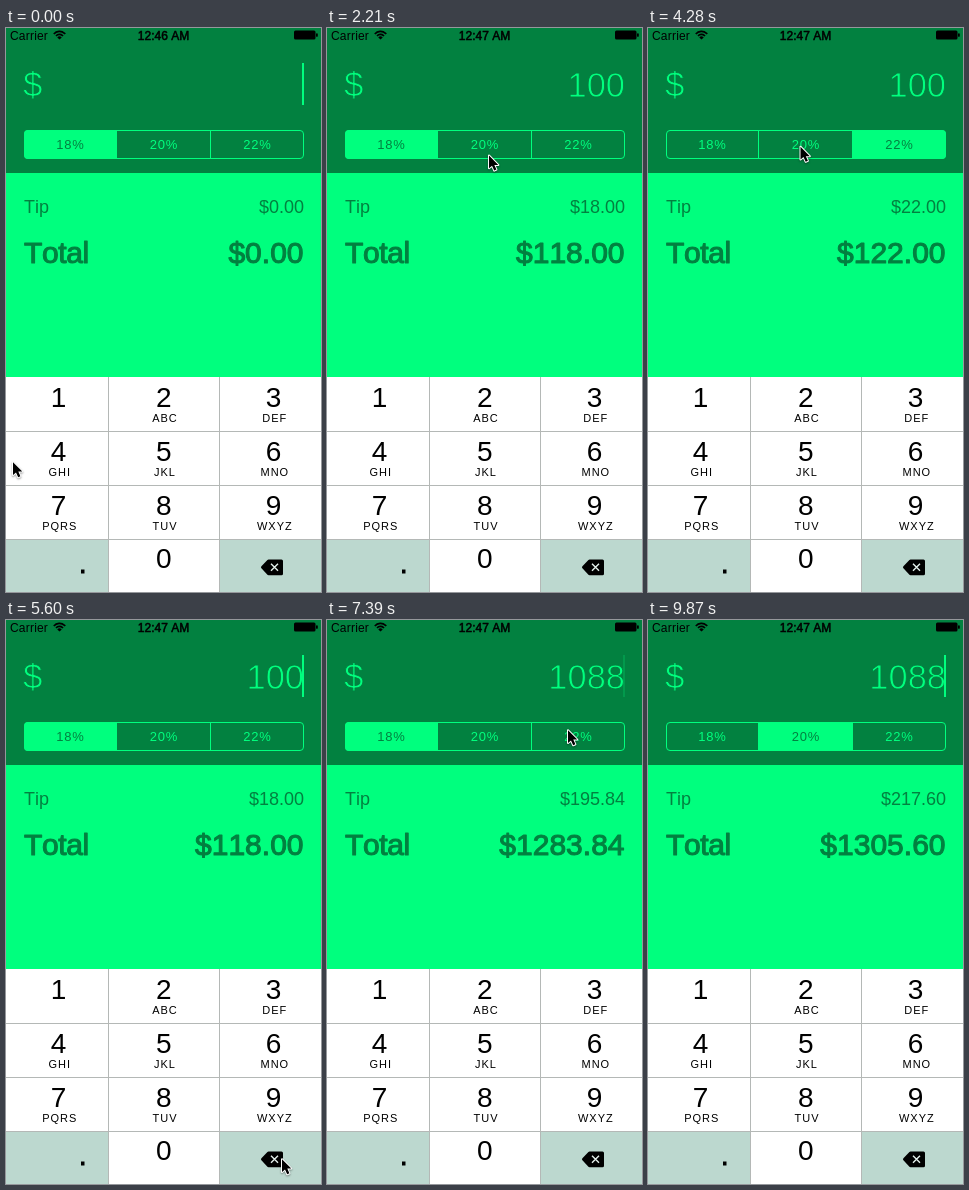
An HTML page with a canvas for the animation above (9970 ms loop, 315x564 px).

```html
<!DOCTYPE html>
<html lang="en">
<head>
<meta charset="utf-8">
<title>Tip calculator</title>
<style>
  html, body { margin: 0; width: 100%; height: 100%; overflow: hidden; background: #00ff7e; }
  canvas { display: block; width: 315px; height: 564px; }
</style>
</head>
<body>
<canvas id="stage" width="315" height="564"></canvas>
<script>
const ctx = document.getElementById('stage').getContext('2d');
const LOOP = 9970, STEP = 147.3;
const DARK = '#028140', NEON = '#00ff7e', TINT = '#bcd8cf', LINE = '#b4b8b6';
const FACE = '"Liberation Sans", Arial, sans-serif';
const BACK = 'back';

// What the user does: key taps, rate choices, and the pointer's moves between stops.
const taps = [[730, 1], [1310, 0], [1600, 0], [5740, BACK], [6180, 8], [6470, 8]]
  .map(([time, key]) => ({ time, key }));
const choices = [[0, 0], [2490, 1], [3670, 2], [5000, 0], [7500, 2], [8530, 1]]
  .map(([time, index]) => ({ time, index }));
const home = { x: 6, y: 433 };
const moves = [
  { from: 0, to: 730, x: 54, y: 380 },
  { from: 880, to: 1178, x: 162, y: 546 },
  { from: 1760, to: 2250, x: 161, y: 118 },
  { from: 2650, to: 3240, x: 246, y: 117 },
  { from: 3770, to: 4730, x: 69, y: 118 },
  { from: 5010, to: 5590, x: 275, y: 538 },
  { from: 5890, to: 6190, x: 162, y: 487 },
  { from: 6630, to: 6930, x: 240, y: 109 },
  { from: 8200, to: 8500, x: 158, y: 117 },
  { from: 8600, to: 9040, x: 330, y: 470 }
];
const rates = [18, 20, 22];

const clamp = v => Math.min(1, Math.max(0, v));
const ease = u => u * u * (3 - 2 * u);

function pointerAt(t) {
  return moves.reduce((p, m) => {
    const u = ease(clamp((t - m.from) / (m.to - m.from)));
    return { x: p.x + (m.x - p.x) * u, y: p.y + (m.y - p.y) * u };
  }, home);
}

function amountAt(t) {
  return taps.filter(tap => tap.time <= t)
    .reduce((s, { key }) => key === BACK ? s.slice(0, -1) : s + key, '');
}

// The caret blinks once a second but stays lit while typing.
function caretAlpha(t) {
  if (taps.some(tap => t >= tap.time && t < tap.time + 500)) return 1;
  const shift = t < 5740 ? 425 : 130;
  const phase = (t + shift) % 1000;
  return phase > 960 ? 1 : clamp((510 - phase) / 80);
}

function rect(color, x, y, w, h) {
  ctx.fillStyle = color;
  ctx.fillRect(x, y, w, h);
}

function rounded(x, y, w, h, r) {
  ctx.beginPath();
  ctx.roundRect(x, y, w, h, r);
}

// An edge stroke in the text colour thickens the letters; in the background colour it thins them.
function text(s, x, y, size, color, { align = 'left', gap = 0, edge = 0, edgeColor = color } = {}) {
  ctx.font = size + 'px ' + FACE;
  ctx.fontKerning = 'none';
  ctx.textAlign = align;
  ctx.letterSpacing = gap + 'px';
  ctx.fillStyle = color;
  if (align === 'center') x += gap / 2;
  ctx.fillText(s, x, y);
  if (edge) {
    ctx.lineWidth = edge;
    ctx.lineJoin = 'round';
    ctx.strokeStyle = edgeColor;
    ctx.strokeText(s, x, y);
  }
}

function statusBar(t) {
  text('Carrier', 4, 11.5, 12, '#000', { gap: .2 });
  text(t < 580 ? '12:46 AM' : '12:47 AM', 157.5, 11.5, 12, '#000', { align: 'center', edge: .5 });
  ctx.strokeStyle = ctx.fillStyle = '#000';
  ctx.lineWidth = 1.7;
  const left = -Math.PI * .77, right = -Math.PI * .23;
  for (const r of [4.6, 7.6]) {
    ctx.beginPath();
    ctx.arc(53.5, 11, r, left, right);
    ctx.stroke();
  }
  ctx.beginPath();
  ctx.moveTo(53.5, 11.5);
  ctx.arc(53.5, 11.5, 3, left, right);
  ctx.fill();
  rounded(288, 2.5, 21.5, 9, 1.5);
  ctx.fill();
  rounded(310, 5.2, 1.8, 3.6, 1);
  ctx.fill();
}

function segments(chosen) {
  const edge = i => Math.round(18 + i * 280 / 3 - .7);
  ctx.save();
  rounded(18, 102, 280, 29, 4);
  ctx.clip();
  rect(NEON, edge(chosen), 102, 94, 29);
  ctx.restore();
  ctx.strokeStyle = NEON;
  ctx.lineWidth = 1;
  rounded(18.5, 102.5, 279, 28, 3.5);
  ctx.stroke();
  for (const x of [110, 204]) rect(NEON, x, 102, 1, 29);
  rates.forEach((rate, i) => text(rate + '%', 64 + i * 93.5, 121, 13,
    i === chosen ? DARK : NEON, { align: 'center', gap: .8 }));
}

function backspace() {
  ctx.fillStyle = ctx.strokeStyle = '#000';
  ctx.lineWidth = 3;
  ctx.lineJoin = 'round';
  ctx.beginPath();
  ctx.moveTo(256.5, 539.3);
  ctx.lineTo(262.5, 533);
  ctx.lineTo(275.5, 533);
  ctx.lineTo(275.5, 545.7);
  ctx.lineTo(262.5, 545.7);
  ctx.closePath();
  ctx.fill();
  ctx.stroke();
  ctx.strokeStyle = '#e4f0ec';
  ctx.lineWidth = 1.4;
  ctx.beginPath();
  for (const s of [-1, 1]) {
    ctx.moveTo(265, 539.3 - 3.5 * s);
    ctx.lineTo(272, 539.3 + 3.5 * s);
  }
  ctx.stroke();
}

function keypad(t) {
  const keys = [1, 2, 3, 4, 5, 6, 7, 8, 9, '.', 0, BACK];
  const letters = ['', 'ABC', 'DEF', 'GHI', 'JKL', 'MNO', 'PQRS', 'TUV', 'WXYZ'];
  const lefts = [0, 103, 214, 315];
  const held = taps.find(tap => t >= tap.time && t < tap.time + STEP);
  rect('#fff', 0, 349, 315, 215);
  keys.forEach((key, i) => {
    const col = i % 3, row = Math.floor(i / 3);
    const left = lefts[col], width = lefts[col + 1] - left;
    const mid = 52.5 + col * 107.5 - (col === 1 ? 2.3 : 0), y = 378.5 + row * 54;
    const down = held && held.key === key;
    const special = key === '.' || key === BACK;
    if (special ? !down : down) rect(TINT, left, 349 + row * 54, width, 54);
    if (key === '.') rect('#000', 75, 541.5, 3.5, 4);
    else if (key === BACK) backspace();
    else text(String(key), mid, key ? y : y - 31 + 30, 28, '#000', { align: 'center' });
    if (letters[i]) text(letters[i], mid + .8, y + 15.5, 11, '#000', { align: 'center', gap: 1 });
  });
  for (const y of [403, 457, 511]) rect(LINE, 0, y, 315, 1);
  for (const x of [102, 213]) rect(LINE, x, 349, 1, 215);
}

function pointer({ x, y }) {
  ctx.save();
  ctx.translate(x, y);
  ctx.beginPath();
  [[1, 1.2], [1, 14], [4, 11.4], [6.2, 16.3], [8.4, 15.3], [6.3, 10.6], [10.3, 10.6]]
    .forEach(p => ctx.lineTo(...p));
  ctx.closePath();
  ctx.lineJoin = 'round';
  ctx.lineWidth = 2;
  ctx.strokeStyle = '#fff';
  ctx.shadowColor = 'rgba(0,0,0,.4)';
  ctx.shadowBlur = 2;
  ctx.shadowOffsetY = 1;
  ctx.stroke();
  ctx.shadowColor = 'transparent';
  ctx.fillStyle = '#000';
  ctx.fill();
  ctx.restore();
}

function draw(t) {
  const amount = amountAt(t);
  const chosen = choices.filter(c => c.time <= t).pop().index;
  const tip = amount * rates[chosen] / 100;
  const thin = { edge: .9, edgeColor: DARK };
  const heavy = { edge: 1.1 };
  rect(DARK, 0, 0, 315, 145);
  rect(NEON, 0, 145, 315, 204);
  statusBar(t);
  text('$', 17, 69, 35, NEON, thin);
  text(amount, 298, 69, 34.5, NEON, { ...thin, align: 'right' });
  ctx.globalAlpha = caretAlpha(t);
  rect(NEON, 296, 35, 2, 42);
  ctx.globalAlpha = 1;
  segments(chosen);
  text('Tip', 18, 185, 18, DARK);
  text('$' + tip.toFixed(2), 298, 185, 18, DARK, { align: 'right' });
  text('Total', 18, 235, 30, DARK, { ...heavy, gap: -.4 });
  text('$' + (+amount + tip).toFixed(2), 297.5, 235, 30, DARK, { ...heavy, align: 'right' });
  keypad(t);
  pointer(pointerAt(t));
}

const begin = performance.now();
function frame() {
  const t = (performance.now() - begin) % LOOP;
  draw(Math.floor(t / STEP) * STEP);
  requestAnimationFrame(frame);
}
frame();
</script>
</body>
</html>
```
